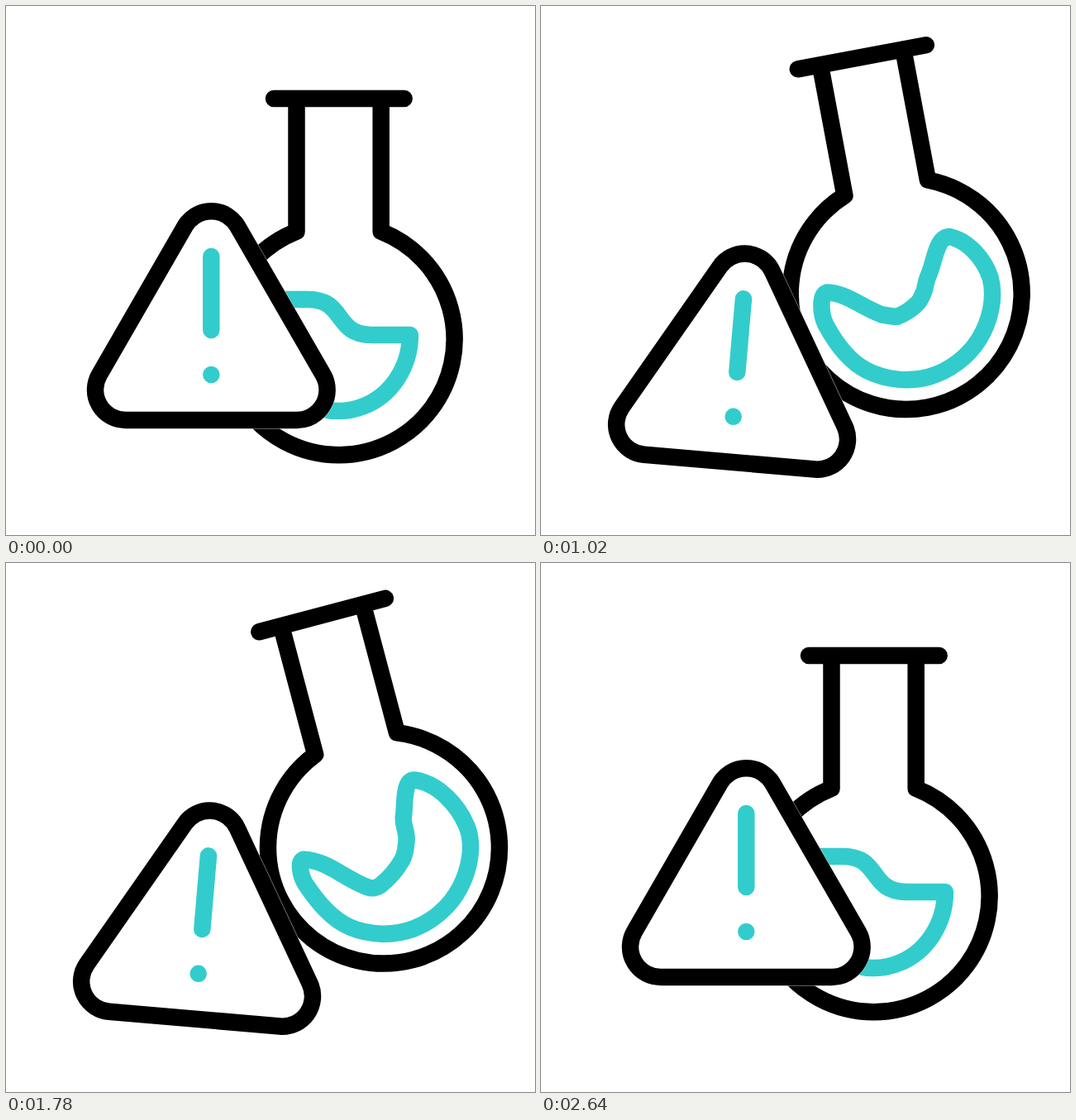
An HTML page that plays this animation: 640 by 640 pixels, repeating every 2880 ms.

```html
<!DOCTYPE html>
<html lang="en">
<head>
<meta charset="utf-8">
<title>Flask warning</title>
<style>
  html, body { margin: 0; width: 100%; height: 100%; overflow: hidden; background: #fff; }
  svg { display: block; width: 100%; height: 100%; }
  .ink { fill: none; stroke: #000; }
  .tint { fill: none; stroke: #3cc; }
</style>
</head>
<body>
<svg viewBox="0 0 640 640" stroke-width="20.5" stroke-linecap="round" stroke-linejoin="round">
  <g id="flask">
    <path id="liquid" class="tint" transform="translate(402.4 403.5)"/>
    <path class="ink" d="M351.5 112V272.8A140 140 0 1 0 453.7 272.8V112M324 112H481.7"/>
  </g>
  <g id="sign">
    <path id="halo" fill="#fff" stroke="#fff" stroke-width="21.2"/>
    <path id="edge" class="ink"/>
    <path class="tint" d="M248.3 303V392M248.3 446h.01"/>
  </g>
</svg>
<script>
const LOOP = 2880, STEP = 20, LIFT = 51.5;
const NECK = [402.5, 191], APEX = [248.3, 264];
const $ = id => document.getElementById(id);

const ease = u => u * u * (3 - 2 * u);
const mix = (a, b, k) => Array.isArray(a) ? a.map((v, i) => mix(v, b[i], k)) : a + (b - a) * k;
const bez = (a, b, c, d, t) => mix(mix(mix(a, b, t), mix(b, c, t), t), mix(mix(b, c, t), mix(c, d, t), t), t);

// Eased value of a list of [time, value] keys
function track(keys, t) {
  const i = keys.findIndex(k => t < k[0]);
  if (i === 0) return keys[0][1];
  if (i < 0) return keys[keys.length - 1][1];
  const [t0, a] = keys[i - 1], [t1, b] = keys[i];
  return mix(a, b, ease((t - t0) / (t1 - t0)));
}

// A liquid pose is a closed ring of nodes [x, y, in dx, dy, out dx, dy] around the bulb centre:
// seven along the surface from left to right, then five back along the bowl.
const BOWL = 5;

// Calm liquid: an S-shaped step from height `left` down to the right rim, over an elliptic bowl
function calm(left, pull) {
  const rx = 86.5, ry = 92, rim = -5.5, x0 = -37, x1 = 40;
  const end = Math.PI - Math.asin((left - rim) / ry), step = end / (BOWL + 1);
  const k = 4 / 3 * Math.tan(step / 4);
  const bowl = i => {
    const c = Math.cos(i * step), s = Math.sin(i * step);
    return [rx * c, rim + ry * s, k * rx * s, -k * ry * c, -k * rx * s, k * ry * c];
  };
  const wave = [0, 1, 2, 3, 4].map(i => {
    const t = i / 4, x = u => bez(x0, x0 + pull, x1 - pull, x1, u), e = 1e-3;
    const dx = (x(t + e) - x(t - e)) / e / 24, dy = (rim - left) * 6 * t * (1 - t) / 12;
    return [x(t), mix(left, rim, ease(t)), -dx, -dy, dx, dy];
  });
  const rightTip = bowl(0), leftTip = bowl(BOWL + 1);
  rightTip.splice(2, 2, -15, 0);
  leftTip.splice(4, 2, 11, 0);
  return [leftTip, ...wave, rightTip, ...[1, 2, 3, 4, 5].map(bowl)];
}

// Sloshing liquid: a smooth curve through the surface points and a round bowl
function wild(...surface) {
  const r = 104, sweep = 170 * Math.PI / 180, ring = [...surface];
  for (let i = 0; i < BOWL; i++) {
    const a = sweep * i / (BOWL - 1);
    ring.push([r * Math.cos(a), r * Math.sin(a)]);
  }
  const n = ring.length;
  return ring.map(([x, y], i) => {
    const [px, py] = ring[(i + n - 1) % n], [nx, ny] = ring[(i + 1) % n];
    const dir = Math.atan2(ny - py, nx - px), c = Math.cos(dir), s = Math.sin(dir);
    const back = -Math.hypot(x - px, y - py) / 3, on = Math.hypot(nx - x, ny - y) / 3;
    return [x, y, back * c, back * s, on * c, on * s];
  });
}

const rest = calm(-48.5, 46), level = calm(3, 20);
const right = wild([-96, -11], [-30, 42], [-15, 43], [18, 20], [30, -4], [33, -31], [58, -70]);
const left = wild([-83, -59], [-49, -88], [-20, -60], [-27, -11], [-22, 35], [19, 52], [94, -5]);
const leftLow = wild([-61, -72], [-6, -97], [0, -45], [-15, 5], [10, 37], [39, 38], [96, -2]);

const lift = [[200, 0], [600, LIFT], [2240, LIFT], [2640, 0]];
const swing = [[600, 0], [900, -15], [1350, 10], [1800, -15], [2190, 10], [2640, 0]];
const tilt = [[600, 0], [1000, 5], [1400, -5], [1800, 5], [2200, 0]];
const slosh = [[200, rest], [600, level], [900, right], [1350, left],
  [1800, right], [2190, leftLow], [2640, rest]];

function liquidPath(pose) {
  let d = `M${pose[0][0]} ${pose[0][1]}`;
  pose.forEach(([x, y, , , ox, oy], i) => {
    const [nx, ny, ix, iy] = pose[(i + 1) % pose.length];
    d += `C${x + ox} ${y + oy} ${nx + ix} ${ny + iy} ${nx} ${ny}`;
  });
  return d + 'Z';
}

function signPath() {
  const r = 36.6, nx = r * Math.cos(Math.PI / 6), ny = r / 2;
  const cx = APEX[0], half = 103.7, low = 464.4, top = low - half * Math.sqrt(3);
  const arc = (x, y) => `A${r} ${r} 0 0 1 ${x} ${y}`;
  return `M${cx - half - nx} ${low - ny}L${cx - nx} ${top - ny}` + arc(cx + nx, top - ny) +
    `L${cx + half + nx} ${low - ny}` + arc(cx + half, low + r) +
    `H${cx - half}` + arc(cx - half - nx, low - ny) + 'Z';
}

function draw(t) {
  const y = track(lift, t);
  $('flask').setAttribute('transform', `translate(0 ${-y}) rotate(${track(swing, t)} ${NECK})`);
  $('sign').setAttribute('transform', `translate(0 ${y}) rotate(${track(tilt, t)} ${APEX})`);
  $('liquid').setAttribute('d', liquidPath(track(slosh, t)));
}

for (const id of ['halo', 'edge']) $(id).setAttribute('d', signPath());
const start = performance.now();
function tick() {
  const t = (performance.now() - start) % LOOP;
  draw(Math.floor(t / STEP) * STEP);
  requestAnimationFrame(tick);
}
tick();
</script>
</body>
</html>
```
